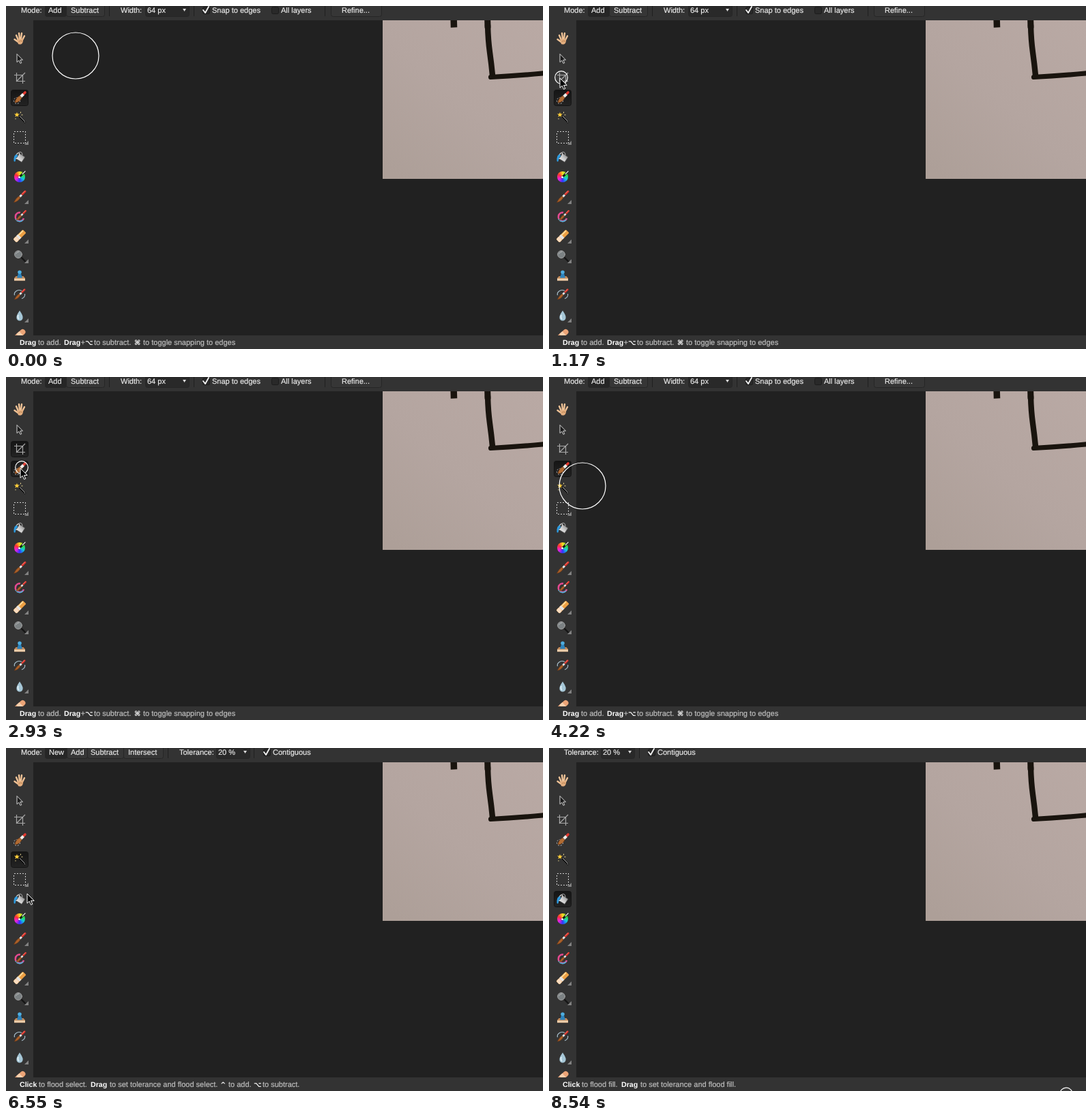
An HTML page that plays this animation: 787 px wide and 504 px high, repeating every 8640 ms.

```html
<!DOCTYPE html>
<html lang="en">
<head>
<meta charset="utf-8">
<title>Tool switching</title>
<style>
  html, body { margin: 0; width: 100%; height: 100%; overflow: hidden; background: #333; }
  svg { display: block; }
  text { font: 11px "Liberation Sans", Arial, sans-serif; fill: #e8e8e8; stroke: #e8e8e8; stroke-width: .2px;
    white-space: pre; text-rendering: geometricPrecision; }
  .status text { fill: #bdbdbd; stroke: #bdbdbd; }
  .status .key { font-weight: bold; font-size: 10.6px; fill: #fff; stroke: none; }
  .status .sym { font: bold 10px "DejaVu Sans", sans-serif; fill: #fff; stroke: none; }
  .wheel { width: 16px; height: 16px; border-radius: 50%;
    background: conic-gradient(from -60deg, #f33, #fd2, #3d3, #1cd, #33f, #e2d, #f33); }
  .line { fill: none; stroke-linecap: round; stroke-linejoin: round; }
</style>
</head>
<body>
<svg width="787" height="504" viewBox="0 0 787 504">
  <defs>
    <linearGradient id="paper" x1="1" y1="0" x2="0.1" y2="1">
      <stop offset="0" stop-color="#b9a9a4"/>
      <stop offset=".55" stop-color="#b4a5a0"/>
      <stop offset="1" stop-color="#ad9f98"/>
    </linearGradient>
    <linearGradient id="metal" x1="0" y1="1" x2="1" y2="0">
      <stop offset="0" stop-color="#fafafa"/><stop offset=".5" stop-color="#c9c9c9"/><stop offset="1" stop-color="#6d6d6d"/>
    </linearGradient>
    <linearGradient id="pressed" x2="0" y2="1">
      <stop offset="0" stop-color="#151515"/><stop offset="1" stop-color="#232323"/>
    </linearGradient>
    <clipPath id="photo"><rect x="552" y="21" width="235" height="233"/></clipPath>
    <clipPath id="rail"><rect y="21" width="40" height="463"/></clipPath>
    <g id="paintbrush" class="line">
      <path d="M8-8L4-4" stroke="#d9342b" stroke-width="3"/>
      <path d="M7.5-8.5L4-5" stroke="#ff9a8c" stroke-width=".8"/>
      <path d="M3-3L0 0" stroke="#e4e4e4" stroke-width="3" stroke-linecap="butt"/>
      <path d="M-1-1Q-5 1-8.5 8Q-2 7 1 1Z" fill="#a9602a" stroke="#6c3512" stroke-width=".6"/>
    </g>
    <path id="pointer" d="M0 0V14.2L3.2 11.2 5.6 16.4 7.8 15.4 5.5 10.4H10.2Z"
      fill="#000" stroke="#fff" stroke-linejoin="round"/>
  </defs>

  <rect width="787" height="504" fill="#333"/>
  <rect x="40" y="21" width="747" height="463" fill="#212121"/>

  <g clip-path="url(#photo)">
    <rect x="552" y="21" width="235" height="233" fill="url(#paper)"/>
    <g class="line" stroke="#19140e">
      <path d="M656 15L656.5 31.5" stroke-width="9.5" stroke-linecap="butt"/>
      <path d="M705.5 14L706 31" stroke-width="9"/>
      <path d="M706 28Q706.5 50 709 68T713 102" stroke-width="8.4"/>
      <path d="M710.5 104.5Q750 102.5 792 98.5" stroke-width="7.2"/>
    </g>
  </g>

  <g id="marks" fill="url(#pressed)" stroke="#141414"></g>

  <g clip-path="url(#rail)">
    <g transform="translate(20 48)" class="line">
      <g stroke="#efc296" stroke-width="2.4">
        <path d="M-2 2L-5-5M0 0L-1-8M2 0L3-8M4 2L7-4M-2 5L-7.5 1"/>
      </g>
      <path d="M-4 1L5 0 5 4Q4 8 1 8.5L-2 8Z" fill="#e2ad7e"/>
      <path d="M-1 4Q2 2 4 4" stroke="#b9804f"/>
    </g>
    <path d="M16 70.5V82.5L18.8 80 21 84.4 22.8 83.5 20.8 79.2H24.5Z" fill="#1c1c1c" stroke="#d4d4d4"/>
    <path transform="translate(20 106)" d="M-4.5-8V4.5H8M-8-4.5H4.5V8M-5 5L8-8" fill="none" stroke="#a8a8a8" stroke-width="1.2"/>
    <g transform="translate(20 135)" class="line">
      <circle cx="-4" cy="4" r="4.5" stroke="#ccc" stroke-width=".9" stroke-dasharray="2 2" stroke-linecap="butt"/>
      <path d="M8-8L6-6" stroke="#e2392f" stroke-width="3.6"/>
      <path d="M5.5-5.5L1.5-1.5" stroke="#f2eeea" stroke-width="4" stroke-linecap="butt"/>
      <path d="M0-3Q-6 0-7 7Q0 7 3 0Z" fill="#b16c34" stroke="#6c3512" stroke-width=".6"/>
    </g>
    <g transform="translate(20 163)" class="line">
      <path d="M-1-1L8 8" stroke="#0c0c0c" stroke-width="2.4"/>
      <path d="M0-1L7 6M7 7L8 8" stroke="#ccc" stroke-width=".8"/>
      <path d="M-4-7L-3-4.5 0-4.5-2.2-2.7-1.5 0-4-1.6-6.5 0-5.8-2.7-8-4.5-5-4.5Z" fill="#ffce3a"/>
      <path d="M1.5-7V-6M3-3H4M-6 2.5V3" stroke="#ffe79a"/>
    </g>
    <rect x="11.5" y="184.5" width="17" height="17" fill="none" stroke="#d0d0d0" stroke-dasharray="2 2" shape-rendering="crispEdges"/>
    <g transform="translate(20 222)" class="line">
      <path d="M-1-6L8 0 3 7.5-6 2Z" fill="url(#metal)" stroke="#4a4a4a" stroke-width=".8"/>
      <ellipse cx="-3.5" cy="-2" rx="2" ry="4.8" transform="rotate(32 -3.5 -2)" fill="#444" stroke="#eee" stroke-width=".9"/>
      <path d="M-4-4Q-9-4-8.5 6Q-6.5 8-6 5Q-6 0-2.5-1Z" fill="#2d9be0"/>
      <path d="M-1-7Q4-9 4-3" stroke="#bbb" stroke-width=".9"/>
    </g>
    <foreignObject x="12" y="243" width="17" height="17"><div xmlns="http://www.w3.org/1999/xhtml" class="wheel"></div></foreignObject>
    <g transform="translate(20 251)" class="line">
      <path d="M-1 1L7-7" stroke="#151515" stroke-width="2.8"/>
      <path d="M4-4L8-8" stroke="#eee" stroke-width="1.2"/>
      <circle r="1.6" cx="-.5" cy=".5" fill="#f4f4f4"/>
    </g>
    <use href="#paintbrush" x="20" y="280.5"/>
    <g transform="translate(20 309)">
      <path d="M1-5.5A6.3 6.3 0 1 0 6 3" fill="none" stroke="#e64a90" stroke-width="2.6"/>
      <path d="M-6 4A6.5 6.5 0 0 0 5 5" fill="none" stroke="#48b6dd" stroke-width="1.6"/>
      <use href="#paintbrush" transform="translate(2 -1) scale(.85)"/>
    </g>
    <g transform="translate(20 338) rotate(-45)">
      <rect x="-10" y="-3.5" width="20" height="7" rx="1.2" fill="#eda044"/>
      <path d="M-4-3.5H0V3.5H-4Z" fill="#e4e4e4"/>
      <rect x="-10" y="-3.5" width="6" height="7" rx="2" fill="#fbdcc0"/>
      <path d="M0-2H9" stroke="#ffe0a0" stroke-width="1.8"/>
    </g>
    <g transform="translate(20 367)" class="line">
      <path d="M3 3L8 8" stroke="#161616" stroke-width="2.4"/>
      <circle cx="-2" cy="-2" r="5.4" fill="#7c8284" stroke="#a0a0a0"/>
      <path d="M-5.5-3Q-4-6-1-6" stroke="#c4c4c4" stroke-width=".8"/>
    </g>
    <g transform="translate(20 396)">
      <path d="M-8 4L-5.5 1H5.5L8 4V7.5H-8Z" fill="#c68a58"/>
      <path d="M-8 4.5H8V7.5H-8Z" fill="#edd0ae"/>
      <path d="M-1.6-4H1.6L4 3.5H-4Z" fill="#2c83bd"/>
      <ellipse cy="-5" rx="2.8" ry="2.6" fill="#4eaee0"/>
    </g>
    <g transform="translate(20 424)">
      <path d="M-7.5 1A7 6 0 0 1 3-5.5M7.5-1A7 6 0 0 1 3 6" fill="none" stroke="#a9c0cd" stroke-width="1.2"/>
      <use href="#paintbrush" transform="scale(.9)"/>
    </g>
    <g transform="translate(20 455)">
      <path d="M0-7.5Q5.2 0 4.6 3A4.6 4.6 0 0 1-4.6 3Q-5.2 0 0-7.5Z" fill="#a5c6d6"/>
      <path d="M-2-1Q-3.5 3-1 5" fill="none" stroke="#eef8fc" stroke-width="1.4"/>
    </g>
    <g transform="translate(20 483) rotate(-42)">
      <rect x="-10" y="-4" width="20" height="8" rx="4" fill="#eba477"/>
      <rect x="-3" y="-4" width="6" height="8" fill="#f8d0ae"/>
    </g>
    <g id="corners" fill="#828282"></g>
  </g>

  <g id="bars"></g>
  <g id="cursors">
    <circle id="brush" r="34" fill="none" stroke="#fff" stroke-width="1.2"/>
    <circle id="ring" cx="2" cy="-1" r="9.3" fill="#fff" fill-opacity=".05" stroke="#fff" stroke-width="1.2"/>
    <use id="arrow" href="#pointer"/>
    <path id="cross" d="M-11 .5H-3M5 .5H12M.5-11V-4M.5 4V12" fill="none" stroke="#fff"/>
  </g>
</svg>

<script>
const $ = id => document.getElementById(id);

// Option bar parts
const label = (x, s, cls = '', y = 10) => `<text x="${x}" y="${y}" class="${cls}">${s}</text>`;
const divider = x => `<path d="M${x}.5 0V15" stroke="#202020"/>`;
const box = (x, w, fill) =>
  `<rect x="${x}.5" y="-6.5" width="${w}" height="22" rx="3" fill="${fill}" stroke="#262626"/>`;
const button = (x, w, tx, s, on) => box(x, w, on ? '#262626' : '#363636') + label(tx, s);
const field = (x, w, s) => box(x, w, '#292929') + label(x + 3, s) +
  `<path d="M${x + w - 9} 4h5l-2.5 4z" fill="#ddd"/>`;
const check = (x, s, on) =>
  `<rect x="${x + 2}.5" y="1.5" width="10" height="10" rx="2" fill="#292929" stroke="#1c1c1c"/>` +
  (on ? `<path d="M${x + 3} 6l3 4 5-9" class="line" stroke="#f4f4f4" stroke-width="1.8"/>` : '') +
  label(x + 16, s);

// Each status part: x, text, class
const status = parts => '<g class="status">' +
  parts.map(([x, s, cls]) => label(x, s, cls, 498)).join('') + '</g>';

const bars = {
  select: label(22, 'Mode:') + button(57, 31, 62, 'Add', true) + button(88, 56, 95, 'Subtract') +
    divider(151) + label(168, 'Width:') + field(204, 64, '64 px') + divider(275) +
    check(286, 'Snap to edges', true) + check(387, 'All layers') + divider(467) +
    button(476, 74, 492, 'Refine...') +
    status([[20, 'Drag', 'key'], [47, 'to add.'], [85, 'Drag', 'key'], [109.5, '+'], [116, '⌥', 'sym'],
      [129, 'to subtract.'], [188, '⌘', 'sym'], [201, 'to toggle snapping to edges']]),
  crop: label(22, 'Mode:') + field(57, 104, 'Unconstrained') + divider(168) +
    button(176, 68, 184, 'Straighten') +
    status([[20, 'Drag', 'key'], [47, 'to adjust the crop area.']]),
  wand: label(22, 'Mode:') + button(57, 32, 63, 'New', true) + button(89, 30, 95, 'Add') +
    button(119, 53, 124, 'Subtract') + button(172, 58, 179, 'Intersect') + divider(237) +
    label(254, 'Tolerance:') + field(308, 49, '20 %') + divider(363) + check(375, 'Contiguous', true) +
    status([[20, 'Click', 'key'], [48, 'to flood select.'], [124, 'Drag', 'key'],
      [152, 'to set tolerance and flood select.'], [314, '^', 'sym'], [326, 'to add.'],
      [363, '⌥', 'sym'], [376, 'to subtract.']]),
  fill: label(22, 'Tolerance:') + field(76, 49, '20 %') + divider(132) + check(143, 'Contiguous', true) +
    status([[20, 'Click', 'key'], [48, 'to flood fill.'], [106, 'Drag', 'key'],
      [134, 'to set tolerance and flood fill.']])
};
const tools = { select: 135, crop: 106, wand: 164, fill: 222 };

for (const name in bars) {
  $('bars').innerHTML += `<g id="bar-${name}">${bars[name]}</g>`;
  $('marks').innerHTML +=
    `<rect id="mark-${name}" x="7.5" y="${tools[name] - 11.5}" width="25" height="23" rx="3"/>`;
}
$('corners').innerHTML = [204, 291, 349, 378, 465].map(y => `<path d="M33 ${y}h-6l6-6z"/>`).join('');

// Pointer path: step, x, y, cursor
const path = [
  [0, 102, 73, 'brush'], [1, 96, 62, 'brush'], [3, 74, 98, 'brush'], [5, 41, 148, 'brush'],
  [6, 30, 138, 'arrow'], [8, 16, 106, 'arrow'], [13, 16, 106, 'arrow'], [16, 81, 207, 'arrow'],
  [17, 81, 207, 'arrow'], [23, 21, 134, 'arrow'], [25, 21, 134, 'arrow'], [26, 60, 148, 'brush'],
  [29, 218, 241, 'brush'], [32, 218, 241, 'brush'], [36, 49, 160, 'brush'], [37, 30, 161, 'arrow'],
  [39, 17, 164, 'arrow'], [42, 17, 164, 'arrow'], [43, 60, 186, 'cross'], [46, 286, 258, 'cross'],
  [51, 286, 258, 'cross'], [55, 50, 212, 'cross'], [56, 31, 214, 'arrow'], [58, 17, 222, 'arrow'],
  [59, 17, 222, 'arrow'], [60, 74, 222, 'cross'], [61, 74, 222, 'cross'], [68, 756, 509.5, 'cross'],
  [70, 756, 509.5, 'arrow'], [99, 756, 509.5, 'arrow']
];
// Step ranges, end excluded
const clicks = [[9, 11], [24, 26], [40, 42], [58, 60], [72, 99]];
const marked = {
  select: [[0, 11], [25, 42]], crop: [[11, 26]], wand: [[42, 60]], fill: [[59, 99]]
};
const barOrder = [[0, 'select'], [11, 'crop'], [25, 'select'], [42, 'wand'], [59, 'fill']];

const within = (ranges, k) => ranges.some(([a, b]) => k >= a && k < b);
const show = (id, on) => $(id).style.display = on ? '' : 'none';
const stepAt = t => t < 7320 ? Math.min(61, Math.floor((t + 2) / 117)) : 62 + Math.floor((t - 7320) / 120);

let last = -1;
function draw(k) {
  const i = path.findLastIndex(p => p[0] <= k);
  const [k0, x0, y0, kind] = path[i], [k1, x1, y1] = path[i + 1];
  const f = (k - k0) / (k1 - k0);
  $('cursors').setAttribute('transform', `translate(${Math.round(x0 + (x1 - x0) * f)} ${y0 + (y1 - y0) * f})`);
  for (const id of ['brush', 'arrow', 'cross']) show(id, id === kind);
  show('ring', within(clicks, k));
  const bar = barOrder.findLast(b => b[0] <= k)[1];
  for (const name in bars) {
    show('bar-' + name, name === bar);
    show('mark-' + name, within(marked[name], k));
  }
}

const start = performance.now();
function tick() {
  const k = stepAt((performance.now() - start) % 8640);
  if (k !== last) draw(last = k);
  requestAnimationFrame(tick);
}
tick();
</script>
</body>
</html>
```
